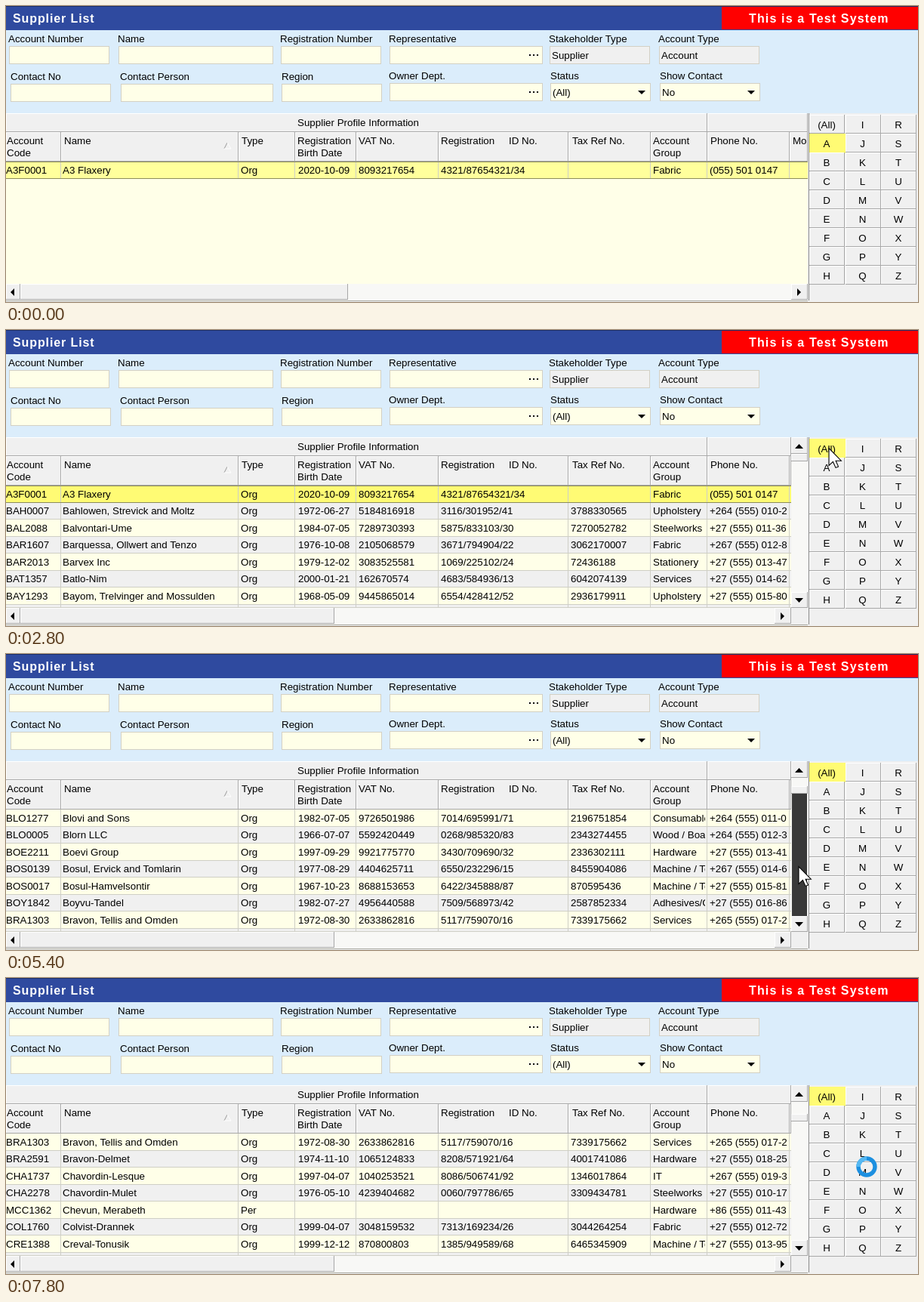
These frames come from a looping animation (1208 by 392 pixels, 8 s). An HTML page:

```html
<!DOCTYPE html>
<html lang="en">
<head>
<meta charset="utf-8">
<title>Supplier List</title>
<style>
  html, body { margin: 0; width: 100%; height: 100%; overflow: hidden; background: #f0f0f0; }
  svg { display: block; }
  #stage { width: 1208px; height: 392px; }
  text { font: 13.35px "Liberation Sans", Arial, sans-serif; fill: #000; white-space: pre; }
  .title { font-size: 16px; font-weight: bold; letter-spacing: .9px; fill: #fff; }
  .banner { letter-spacing: 1.15px; }
  .mid { text-anchor: middle; }
  rect { shape-rendering: crispEdges; }
</style>
</head>
<body>
<svg id="stage" viewBox="0 0 1208 392">
  <g id="form"></g>
  <g id="grid"></g>
  <path id="arrow" d="M0 0V23L5.4 17.9 9 25.9 12.5 24.4 9.1 16.7H16.3Z" fill="#fff" stroke="#000" stroke-width="1.1"/>
  <g id="busy" fill="none" stroke-width="5.4">
    <circle cx="1140" cy="250" r="11" stroke="#1c8fe0"/>
    <path d="M1129 250A11 11 0 0 1 1140 239" stroke="#55b8f2"/>
  </g>
</svg>
<script>
const LOOP = 8000, STEP = 200;
const IVORY = '#ffffe8', FACE = '#f0f0f0', LINE = '#cfcfc6', SHADE = '#a8a8a8', ACTIVE = '#fffb74';
const EDGES = [0, 72, 307, 382, 463, 572, 744, 853, 928, 1037];
const TEXT_X = [0, 75, 311, 387, 467, 576, 748, 857, 932];
const ROW_TOP = 206, ROW_H = 22.5, GRID_END = 368;

// code | name | type | date | VAT | registration | tax | group | phone
const suppliers = `
A3F0001|A3 Flaxery|Org|2020-10-09|8093217654|4321/87654321/34||Fabric|(055) 501 0147
BAH0007|Bahlowen, Strevick and Moltz|Org|1972-06-27|5184816918|3116/301952/41|3788330565|Upholstery|+264 (555) 010-2
BAL2088|Balvontari-Ume|Org|1984-07-05|7289730393|5875/833103/30|7270052782|Steelworks|+27 (555) 011-36
BAR1607|Barquessa, Ollwert and Tenzo|Org|1976-10-08|2105068579|3671/794904/22|3062170007|Fabric|+267 (555) 012-8
BAR2013|Barvex Inc|Org|1979-12-02|3083525581|1069/225102/24|72436188|Stationery|+27 (555) 013-47
BAT1357|Batlo-Nim|Org|2000-01-21|162670574|4683/584936/13|6042074139|Services|+27 (555) 014-62
BAY1293|Bayom, Trelvinger and Mossulden|Org|1968-05-09|9445865014|6554/428412/52|2936179911|Upholstery|+27 (555) 015-80
BEC1418|Becavon-Lurrie|Org|1991-03-14|4170938262|2207/613845/19|5518206473|Hardware|+27 (555) 016-13
BEL0926|Belquist and Sons|Org|1978-08-22|7735102948|8143/270596/37|1904637285|Fabric|+264 (555) 017-5
BER2174|Bervolt, Anduin and Kest|Org|1986-11-30|3629481075|5092/846137/61|8260395147|Services|+27 (555) 018-29
BIN1105|Binvarro Group|Org|1995-02-17|6048217390|7316/405928/48|4739152806|Stationery|+267 (555) 019-7
BLI0348|Blivenne-Tor|Org|1970-09-06|9182573604|0475/938216/25|6391840527|Steelworks|+27 (555) 010-94
BLO1277|Blovi and Sons|Org|1982-07-05|9726501986|7014/695991/71|2196751854|Consumables|+264 (555) 011-0
BLO0005|Blorn LLC|Org|1966-07-07|5592420449|0268/985320/83|2343274455|Wood / Board|+264 (555) 012-3
BOE2211|Boevi Group|Org|1997-09-29|9921775770|3430/709690/32|2336302111|Hardware|+27 (555) 013-41
BOS0139|Bosul, Ervick and Tomlarin|Org|1977-08-29|4404625711|6550/232296/15|8455904086|Machine / Tools|+267 (555) 014-6
BOS0017|Bosul-Hamvelsontir|Org|1967-10-23|8688153653|6422/345888/87|870595436|Machine / Tools|+27 (555) 015-81
BOY1842|Boyvu-Tandel|Org|1982-07-27|4956440588|7509/568973/42|2587852334|Adhesives/Glue|+27 (555) 016-86
BRA1303|Bravon, Tellis and Omden|Org|1972-08-30|2633862816|5117/759070/16|7339175662|Services|+265 (555) 017-2
BRA2591|Bravon-Delmet|Org|1974-11-10|1065124833|8208/571921/64|4001741086|Hardware|+27 (555) 018-25
CHA1737|Chavordin-Lesque|Org|1997-04-07|1040253521|8086/506741/92|1346017864|IT|+267 (555) 019-3
CHA2278|Chavordin-Mulet|Org|1976-05-10|4239404682|0060/797786/65|3309434781|Steelworks|+27 (555) 010-17
MCC1362|Chevun, Merabeth|Per|||||Hardware|+86 (555) 011-43
COL1760|Colvist-Drannek|Org|1999-04-07|3048159532|7313/169234/26|3044264254|Fabric|+27 (555) 012-72
CRE1388|Creval-Tonusik|Org|1999-12-12|870800803|1385/949589/68|6465345909|Machine / Tools|+27 (555) 013-95
`.trim().split('\n').map(line => line.split('|'));

const $ = id => document.getElementById(id);
const text = (x, y, s, cls = '') => `<text x="${x}" y="${y}" class="${cls}">${s}</text>`;
const rect = (x, y, w, h, fill) => `<rect x="${x}" y="${y}" width="${w}" height="${h}" fill="${fill}"/>`;
const shape = (d, fill = '#000') => `<path d="${d}" fill="${fill}"/>`;
const box = (x, y, w, h, fill, edge) => rect(x, y, w, h, edge) + rect(x + 1, y + 1, w - 2, h - 2, fill);
const raised = (x, y, w, h, fill = FACE) =>
  rect(x, y, w, h, SHADE) + rect(x, y, w - 1, h - 1, '#fff') + rect(x + 1, y + 1, w - 2, h - 2, fill);

function drawForm() {
  const field = (label, lx, ly, x, y, w, fill = IVORY, value = '') =>
    text(lx, ly, label) + box(x, y, w, 24, fill, '#d3d0c4') + text(x + 3, y + 17, value);
  const dots = y => [693, 698, 703].map(x => rect(x, y, 2, 2, '#000')).join('');
  const drop = x => shape(`M${x - 5} 112h10l-5 5z`);
  return rect(0, 0, 1208, 32, '#2f4a9f') + rect(0, 0, 1208, 1, '#1d2f66') + rect(948, 1, 260, 30, '#f00')
    + text(9, 22, 'Supplier List', 'title') + text(984, 22, 'This is a Test System', 'title banner')
    + rect(0, 32, 1208, 110, '#dbedfb')
    + field('Account Number', 3, 48, 4, 53, 133)
    + field('Name', 148, 48, 149, 53, 205)
    + field('Registration Number', 363, 48, 364, 53, 133)
    + field('Representative', 507, 48, 508, 53, 203)
    + field('Stakeholder Type', 719, 48, 720, 53, 133, FACE, 'Supplier')
    + field('Account Type', 864, 48, 865, 53, 133, FACE, 'Account')
    + field('Contact No', 6, 98, 6, 103, 133)
    + field('Contact Person', 151, 98, 152, 103, 202)
    + field('Region', 365, 98, 365, 103, 133)
    + field('Owner Dept.', 507, 97, 508, 102, 203)
    + field('Status', 721, 97, 721, 102, 133, IVORY, '(All)')
    + field('Show Contact', 866, 97, 866, 102, 133, IVORY, 'No')
    + dots(64) + dots(113) + drop(842) + drop(987);
}

function drawHeader(right) {
  const cells = EDGES.map((x, i) => {
    const end = Math.min((EDGES[i + 1] || right) + 1, right);
    const start = i ? x + 1 : 0;
    return raised(start, 167, end - start, 39);
  }).join('');
  const labels = [[1, 'Account', 'Code'], [77, 'Name'], [312, 'Type'], [386, 'Registration', 'Birth Date'],
    [467, 'VAT No.'], [576, 'Registration'], [666, 'ID No.'], [750, 'Tax Ref No.'],
    [857, 'Account', 'Group'], [933, 'Phone No.']];
  return raised(0, 142, 929, 25) + raised(929, 142, right - 929, 25) + cells
    + text(386, 159, 'Supplier Profile Information')
    + labels.map(([x, top, low]) => text(x, 183, top) + (low ? text(x, 199, low) : '')).join('')
    + '<path d="M289 189L293 181" stroke="#999"/><path d="M293 181L298 189H289" fill="none" stroke="#fff"/>'
    + (right > 1050 ? `<svg x="1038" y="168" width="23" height="30">${text(4, 15, 'Mo')}</svg>` : '');
}

function drawRows(rows, right, chosen) {
  let out = rect(0, ROW_TOP, right, GRID_END - ROW_TOP, IVORY);
  const count = rows.length > 1 ? 8 : 1;
  for (let i = 0; i < count; i++) {
    const y = ROW_TOP + i * ROW_H, h = Math.min(ROW_H, GRID_END - y);
    out += rect(0, y, right, h, i === 0 && chosen || (i % 2 ? FACE : IVORY)) + rect(0, y + h - 1, right, 1, LINE);
  }
  const bottom = count > 1 ? GRID_END : ROW_TOP + ROW_H;
  EDGES.slice(1).forEach(x => out += rect(x, ROW_TOP, 1, bottom - ROW_TOP, LINE));
  if (chosen) out += rect(0, ROW_TOP, right, 1, '#8c8c5a') + rect(0, ROW_TOP + 22, right, 1, '#8c8c5a');
  TEXT_X.forEach((x, c) => {
    const column = rows.map((row, i) => text(x - EDGES[c], 15.5 + i * ROW_H, row[c])).join('');
    out += `<svg x="${EDGES[c]}" y="${ROW_TOP}" width="${EDGES[c + 1] - EDGES[c] - 2}" height="162">${column}</svg>`;
  });
  return out;
}

function drawScrollbars(right, page, pressed) {
  const wide = page < 0;
  let out = rect(0, 368, 1062, 22, '#f8f8f6') + raised(0, 368, 19, 21) + raised(19, 368, wide ? 434 : 416, 21)
    + raised(right - 22, 368, 22, 21) + shape('M11 374v10l-5-5z') + shape(`M${right - 14} 374v10l5-5z`)
    + rect(0, 390, 1062, 1, '#a8a8a0');
  if (wide) return out;
  const thumb = 164 + Math.round(page * 5.3);
  return out + rect(1040, 142, 22, 226, '#f8f8f6') + rect(1040, 368, 22, 22, FACE)
    + (pressed ? rect(1041, thumb + 10, 20, 347 - thumb - 10, '#393939') : '')
    + raised(1040, 142, 22, 22) + raised(1040, thumb, 22, 10) + raised(1040, 347, 22, 21)
    + shape('M1045 157h11l-5.5-6z') + shape('M1045 355h11l-5.5 6z');
}

function drawLetters(active) {
  const labels = ['(All)', ...'ABCDEFGHIJKLMNOPQRSTUVWXYZ'];
  const buttons = labels.map((label, i) => {
    const x = 1064 + Math.floor(i / 9) * 47.5, y = 144 + i % 9 * 25;
    const face = label === active ? rect(x, y, 48, 26, ACTIVE) : raised(x, y, 47, 25);
    return face + text(x + 23, y + 18, label, 'mid');
  });
  return rect(1062, 142, 146, 250, FACE) + rect(1063, 142, 1, 248, '#8a8a8a') + buttons.join('');
}

function drawGrid(page, letter, pressed) {
  const right = page < 0 ? 1062 : 1040;
  const rows = page < 0 ? suppliers.slice(0, 1) : suppliers.slice(page * 6, page * 6 + 7);
  const chosen = page < 0 ? '#ffff9c' : page === 0 ? ACTIVE : '';
  return drawRows(rows, right, chosen) + drawHeader(right)
    + drawScrollbars(right, page, pressed) + drawLetters(letter);
}

// time, x, y of the pointer tip
const route = [[1600, 1135, 163], [2200, 1090, 157], [2800, 1090, 157], [3600, 1052, 205], [4000, 1052, 205],
  [4400, 1047, 221], [5000, 1050, 282], [5400, 1050, 282], [6000, 1053, 298], [6400, 1053, 298], [7400, 1142, 250]];

// moments when the list loads and when each page-down click lands
const LOADED = 2800, CLICKS = [5000, 5400, 5800];

function pointerAt(t) {
  const next = route.findIndex(key => key[0] > t);
  if (next < 0) return route[route.length - 1].slice(1);
  const [t0, x0, y0] = route[Math.max(next - 1, 0)], [t1, x1, y1] = route[next];
  const k = t1 > t0 ? (t - t0) / (t1 - t0) : 0;
  return [x0 + (x1 - x0) * k, y0 + (y1 - y0) * k];
}

let shown = '';
function frame() {
  const t = Math.floor(performance.now() % LOOP / STEP) * STEP;
  const page = t < LOADED ? -1 : CLICKS.filter(click => t >= click).length;
  const letter = t < 2400 ? 'A' : '(All)';
  const pressed = CLICKS.includes(t);
  const key = [page, letter, pressed].join();
  if (key !== shown) {
    $('grid').innerHTML = drawGrid(page, letter, pressed);
    shown = key;
  }
  const [x, y] = pointerAt(t).map(Math.round);
  $('arrow').setAttribute('transform', `translate(${x} ${y - .5})`);
  $('arrow').style.display = t >= 1600 && t < 7800 ? '' : 'none';
  $('busy').style.display = t >= 7800 ? '' : 'none';
  requestAnimationFrame(frame);
}

$('form').innerHTML = drawForm();
frame();
</script>
</body>
</html>
```
